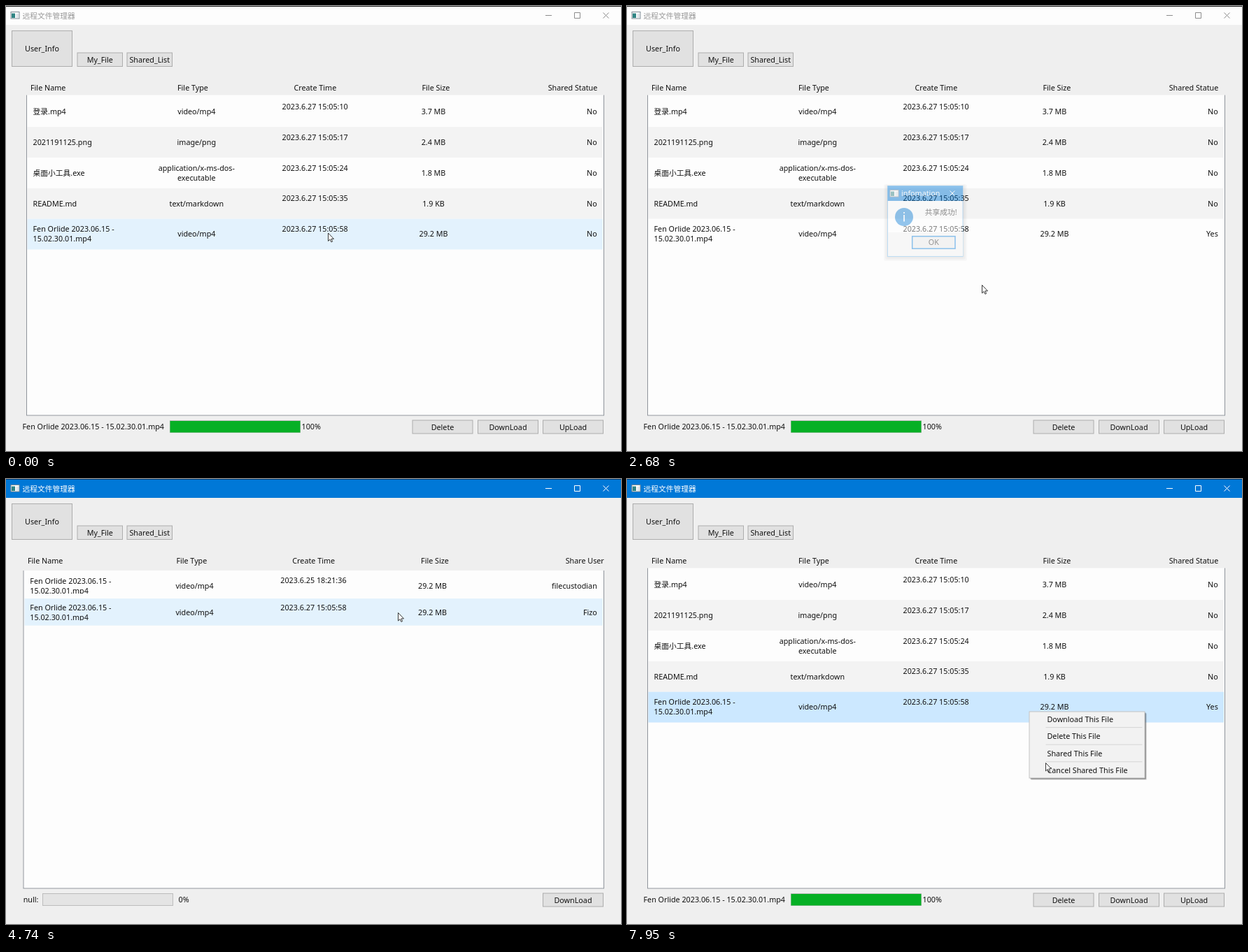
Recreate the animation shown at these times as an HTML page. Size 879x637 px, loop 7990 ms.

```html
<!DOCTYPE html>
<html lang="zh">
<head>
<meta charset="utf-8">
<style>
html, body { margin: 0; width: 100%; height: 100%; overflow: hidden; background: #efefef; }
svg { display: block; width: 100%; height: 100%; }
text { font: 10.75px "Noto Sans", "Noto Sans CJK SC", "Noto Sans CJK", sans-serif; fill: #111; white-space: pre; }
</style>
</head>
<body>
<svg id="stage" viewBox="0 0 879 637"></svg>
<script>
const LOOP = 7990;
const HOVER_LAG = 40;
const CLIP = ['Fen Orlide 2023.06.15 -', '15.02.30.01.mp4'];
const $ = id => document.getElementById(id);

const rect = (x, y, w, h, fill, more = '') =>
  `<rect x="${x}" y="${y}" width="${w}" height="${h}" fill="${fill}" ${more}/>`;
const text = (x, y, s, anchor = 'start', more = '') =>
  `<text x="${x}" y="${y}" text-anchor="${anchor}" ${more}>${s}</text>`;
const path = (d, stroke, more = '') =>
  `<path d="${d}" stroke="${stroke}" fill="none" ${more}/>`;
const group = (id, body, more = '') => `<g id="${id}" ${more}>${body}</g>`;
const lines = (x, y, list, anchor) =>
  list.map((s, i) => text(x, y + (i - (list.length - 1) / 2) * 14, s, anchor)).join('');

function button(x, y, w, h, label, id = '') {
  return rect(x + .5, y + .5, w - 1, h - 1, '#e1e1e1', `stroke="#adadad" id="${id}"`) +
    text(x + w / 2, y + h / 2 + 4.2, label, 'middle');
}

function progress(x, value) {
  return rect(x + .5, 593.5, 186, 17, '#e4e4e4', 'stroke="#bcbcbc"') +
    rect(x + .5, 594, 186 * value, 16.5, '#06b025');
}

function frame(x, y) {
  return rect(x, y, 855 - x, 586.5 - y, '#fdfdfd') +
    path(`M${x + .5} ${y}V586M854.5 ${y}V586`, '#8f949b') +
    path(`M${x} 586H855`, '#8f949b');
}

const windowIcon = (x, y) =>
  rect(x + .5, y + .5, 12, 9.5, '#fff', 'stroke="#7d8a94"') +
  rect(x + 1.5, y + 2.5, 5, 6.5, '#2f8484') + rect(x + 8, y + 2.5, 3.5, 6.5, '#dfe5ea');

// Page layouts: table top, row height and the fills that rows can take
const pages = {
  mine: {
    top: 129.3, pitch: 43.85, left: 30.5,
    fill: ['#fdfdfd', '#f3f3f3'], hover: ['#e3f2fd', '#dbe9f2'],
    rows: [
      [['登录.mp4'], ['video/mp4'], '10', '3.7 MB'],
      [['2021191125.png'], ['image/png'], '17', '2.4 MB'],
      [['桌面小工具.exe'], ['application/x-ms-dos-', 'executable'], '24', '1.8 MB'],
      [['README.md'], ['text/markdown'], '35', '1.9 KB'],
      [CLIP, ['video/mp4'], '58', '29.2 MB']
    ]
  },
  shared: {
    top: 132.5, pitch: 38.6, left: 26.5,
    fill: ['#fdfdfd', '#f3f3f3'], hover: ['#e3f2fd', '#e3f2fd'],
    rows: [['2023.6.25 18:21:36', 'filecustodian'], ['2023.6.27 15:05:58', 'Fizo']]
  }
};

function rowRects(name) {
  const p = pages[name];
  return p.rows.map((r, i) =>
    rect(p.left, p.top + p.pitch * i, 853 - p.left, p.pitch, p.fill[i % 2], `id="${name}${i}"`)).join('');
}

function headers(dx, last, right) {
  return text(35 - dx * 2, 121, 'File Name') + text(245 - dx * .8, 121, 'File Type') +
    text(411.5 - dx * 1.1, 121, 'Create Time') + text(594.5 - dx * .7, 121, 'File Size') +
    text(right, 121, last, 'end');
}

function minePage() {
  const p = pages.mine;
  const cells = p.rows.map(([name, type, sec, size], i) => {
    const y = 155 + p.pitch * i;
    return lines(38.5, y, name) + lines(272.3, y, type, 'middle') +
      text(394.5, y - 7.2, '2023.6.27 15:05:' + sec) + text(611, y, size, 'middle') +
      text(844.8, y, 'No', 'end', `id="state${i}"`);
  }).join('');
  return headers(0, 'Shared Statue', 845.3) + frame(29, 127.5) + rowRects('mine') + cells +
    text(23.5, 606, CLIP.join(' ')) + progress(234, 1) + text(422.5, 606, '100%') +
    button(580.5, 592.5, 87, 20, 'Delete') + button(674, 592.5, 87, 20, 'DownLoad') +
    button(767, 592.5, 87, 20, 'UpLoad');
}

function sharedPage() {
  const p = pages.shared;
  const cells = p.rows.map(([time, user], i) => {
    const y = 156.5 + p.pitch * i;
    return group('', lines(34.3, y, CLIP), `clip-path="url(#cut${i})"`) +
      `<clipPath id="cut${i}">${rect(26, y - 20, 300, 27.5, '#000')}</clipPath>` +
      text(269.5, y, 'video/mp4', 'middle') + text(392.3, y - 7.2, time) +
      text(609.5, y, '29.2 MB', 'middle') + text(844.8, y, user, 'end');
  }).join('');
  return headers(2, 'Share User', 854.8) + frame(24.5, 131) + rowRects('shared') + cells +
    text(24.7, 606, 'null:') + progress(52, 0) + text(246.5, 606, '0%') +
    button(767, 592.5, 87, 20, 'DownLoad');
}

// Context menu, drawn from its own corner
function menu() {
  const labels = ['Download This File', 'Delete This File', 'Shared This File', 'Cancel Shared This File'];
  return rect(3, 3, 165, 95, '#000', 'opacity=".22"') + rect(2, 2, 165, 95, '#000', 'opacity=".38"') +
    rect(.5, .5, 165, 95, '#f2f2f2', 'stroke="#c4c4c4"') +
    rect(2.5, 0, 159, 17.2, '#91c9f7', 'id="pick"') +
    labels.map((s, i) => text(26, 15 + 24.6 * i, s) +
      (i ? path(`M24 ${24.6 * i - 1.5}H162`, '#d5d5d5') : '')).join('');
}

function dialog() {
  const shadow = [6, 4, 2].map(d =>
    rect(373 - d, 258 - d / 2, 107 + d * 2, 101 + d * 1.5, '#000', 'rx="3" opacity=".06"')).join('');
  return shadow + rect(372.5, 257.5, 107.5, 101, '#fff', 'stroke="#6fb4e8"') +
    rect(373, 324, 107, 34, '#f0f0f0') + rect(372.5, 257.5, 107.5, 21.5, '#0078d7') +
    windowIcon(375.5, 263) + text(392, 272.3, 'infomation', 'start', 'style="fill:#fff"') +
    path('M461.5 264.5l7 7m0-7l-7 7', '#fff') +
    '<circle cx="396" cy="302" r="13" fill="#1080d8"/>' +
    rect(395.2, 299, 1.7, 9.5, '#fff') + rect(395.2, 295, 1.7, 2, '#fff') +
    text(425.8, 298.5, '共享成功!') +
    rect(407.7, 329.7, 61.3, 17.6, '#e6e6e6', 'stroke="#0078d7" stroke-width="1.5"') +
    text(438.3, 342.4, 'OK', 'middle');
}

$('stage').innerHTML =
  rect(0, 0, 879, 637, '#efefef') +
  rect(0, 0, 879, 27, '#fdfdfd', 'id="bar"') + rect(0, 0, 879, 1, '#222', 'id="edge"') +
  windowIcon(6.5, 8) + text(23.5, 17.6, '远程文件管理器', 'start', 'id="title"') +
  path('M771 13.5h9M812.5 9.5h8v8h-8zM853.5 9.5l8 8m0-8l-8 8', '#888', 'id="controls"') +
  button(8, 35, 87, 52, 'User_Info') +
  button(101.5, 66.5, 65.5, 20.5, 'My_File', 'tabMine') +
  button(172.5, 66.5, 65.5, 20.5, 'Shared_List', 'tabShared') +
  group('mine', minePage()) + group('shared', sharedPage()) +
  group('menu', menu()) + group('dialog', dialog()) +
  group('cursor', '<path d="M.5 .5V12L3.1 9.6L4.9 13.4L6.6 12.6L4.9 8.9H8.5Z" fill="#fff" stroke="#222" stroke-width=".9"/>');

// Pointer stops: time, x, y
const stops = [
  [0, 460, 324.5], [280, 460, 324.5], [520, 466, 321.5], [760, 466, 321.5],
  [1050, 531, 378], [1220, 531, 378], [1300, 533, 380], [1660, 533, 380],
  [2000, 515, 414], [2400, 507, 399], [2760, 507, 399], [3080, 438, 338],
  [3240, 438, 338], [3530, 259, 167], [3860, 205, 77], [4110, 205, 77],
  [4740, 560, 191], [5190, 560, 191], [5750, 136, 76], [6000, 136, 76],
  [6600, 574, 332], [7580, 574, 332], [7950, 598, 406], [7990, 598, 406]
];

const clamp = v => Math.max(0, Math.min(1, v));
const ease = v => v * v * (3 - 2 * v);
const ramp = (t, a, b) => ease(clamp((t - a) / (b - a)));
const within = (t, a, b) => t >= a && t < b;
const show = (id, on) => $(id).setAttribute('display', on ? 'inline' : 'none');

// Speed at a stop: zero where the pointer rests, else the mean through it
function speed(i, axis) {
  const a = stops[i - 1], b = stops[i], c = stops[i + 1];
  if (!a || !c || a[axis] === b[axis] || b[axis] === c[axis]) return 0;
  return (c[axis] - a[axis]) / (c[0] - a[0]);
}

// Smooth (Hermite) path through the stops
function pointer(t) {
  const i = stops.findIndex(s => s[0] > t);
  const a = stops[i - 1], b = stops[i], span = b[0] - a[0];
  const u = (t - a[0]) / span, v = 1 - u, k = ease(u);
  return [1, 2].map(axis => a[axis] + (b[axis] - a[axis]) * k +
    span * u * v * (v * speed(i - 1, axis) - u * speed(i, axis)));
}

function paintTitle(t) {
  const active = t >= 600 && !within(t, 2400, 3240);
  $('bar').setAttribute('fill', active ? '#0078d7' : '#fdfdfd');
  $('edge').setAttribute('fill', active ? '#0b3f73' : '#222');
  $('title').style.fill = active ? '#fff' : '#999';
  $('controls').setAttribute('stroke', active ? '#fff' : '#8c8c8c');
}

function paintTab(id, x, px, py) {
  const over = px >= x && px < x + 65 && py >= 67 && py < 87;
  $(id).setAttribute('fill', over ? '#e5f1fb' : '#e1e1e1');
  $(id).setAttribute('stroke', over ? '#0078d7' : '#adadad');
}

function paintRows(name, t, px, py, blocked) {
  const p = pages[name];
  const over = blocked || px < p.left || px > 853 ? -1 : Math.floor((py - p.top) / p.pitch);
  const selected = name === 'mine' && (within(t, 600, 2400) || t >= 7050) ? 4 : -1;
  p.rows.forEach((r, i) => $(name + i).setAttribute('fill',
    i === selected ? '#cce8ff' : i === over ? p.hover[i % 2] : p.fill[i % 2]));
}

function paintMenu(open, x, y, px, py) {
  show('menu', open);
  if (!open) return;
  $('menu').setAttribute('transform', `translate(${x} ${y})`);
  const dy = py - y - 2.5, item = Math.floor(dy / 24.6);
  const over = px > x + 2 && px < x + 162 && dy >= 0 && item < 4 && dy - item * 24.6 < 17.5;
  show('pick', over);
  $('pick').setAttribute('y', 2.5 + 24.6 * item);
}

function paintDialog(t) {
  const k = ramp(t, 2560, 2820) * (1 - ramp(t, 3240, 3580));
  const s = .94 + .06 * ramp(t, 2500, 2680);
  show('dialog', k > 0);
  $('dialog').setAttribute('opacity', k);
  $('dialog').setAttribute('transform', `translate(426.5 308) scale(${s}) translate(-426.5 -308)`);
}

function render(t) {
  const [px, py] = pointer(t);
  const [hx, hy] = pointer(Math.max(0, t - HOVER_LAG));
  const first = within(t, 640, 1440), second = t >= 7090;
  const blocked = first || second || within(t, 2400, 3240);
  const onShared = within(t, 4090, 5960);
  show('mine', !onShared);
  show('shared', onShared);
  $('state4').textContent = t < 2400 ? 'No' : 'Yes';
  paintTitle(t);
  paintTab('tabMine', 101.5, hx, hy);
  paintTab('tabShared', 172.5, hx, hy);
  paintRows(onShared ? 'shared' : 'mine', t, hx, hy, blocked);
  paintMenu(first || second, first ? 466.2 : 574.5, first ? 322 : 332.5, px, py);
  paintDialog(t);
  $('cursor').setAttribute('transform', `translate(${px} ${py})`);
}

const start = performance.now();
function tick() {
  render((performance.now() - start) % LOOP);
  requestAnimationFrame(tick);
}
tick();
</script>
</body>
</html>
```
